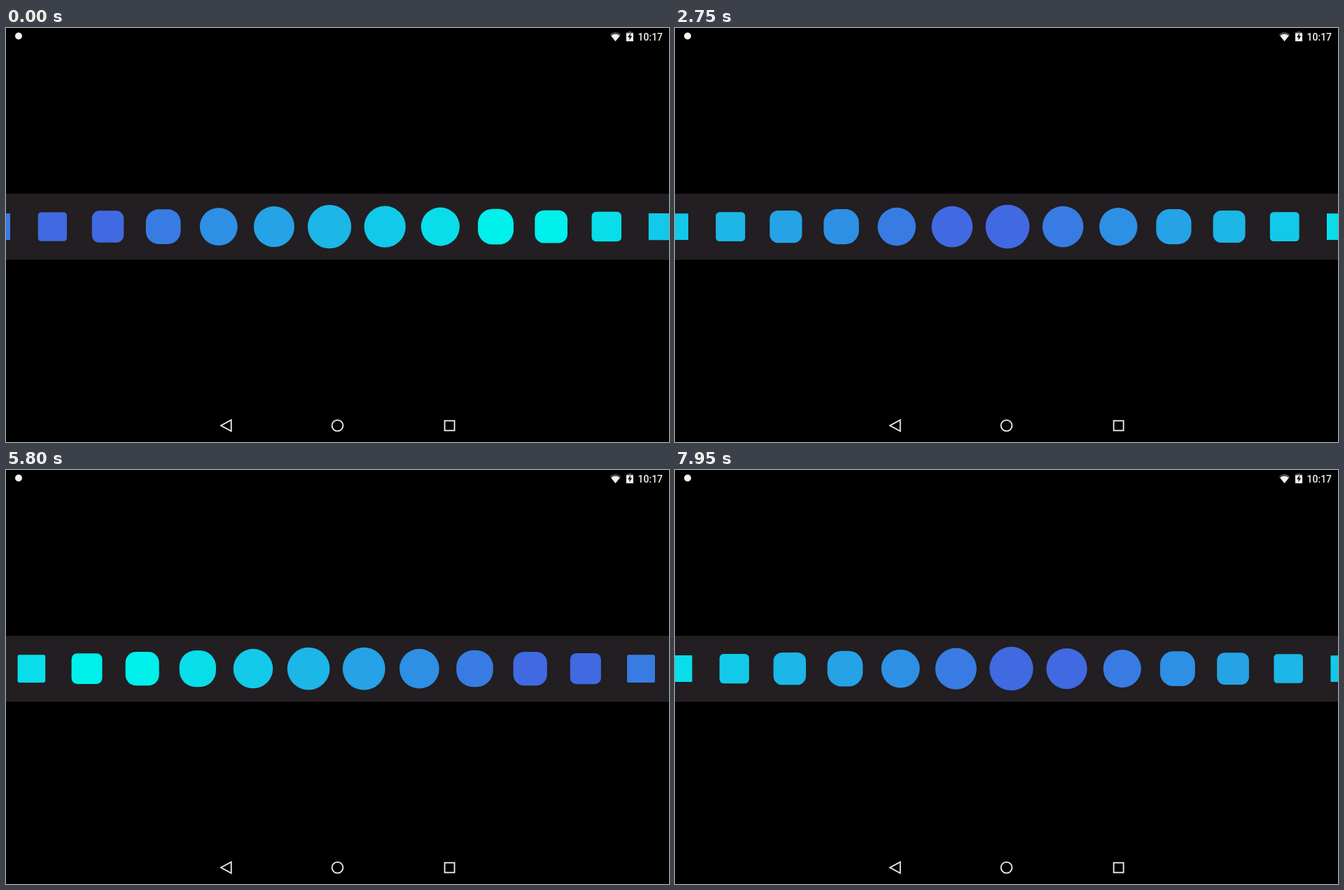
Recreate the animation shown at these times as an HTML page. Size 947 by 592 pixels, loop 8000 ms.

```html
<!DOCTYPE html>
<html lang="en">
<head>
<meta charset="utf-8">
<title>Shape carousel</title>
<style>
  html, body { margin: 0; width: 100%; height: 100%; overflow: hidden; background: #000; }
  svg { display: block; width: 100vw; height: 100vh; }
  text { font: 500 14px Roboto, sans-serif; fill: #f2f2f2; }
</style>
</head>
<body>
<svg viewBox="0 0 947 592">
  <rect width="947" height="592" fill="#000"/>
  <rect y="237" width="947" height="94.5" fill="#221e21"/>
  <g id="row"></g>

  <g fill="#f2f2f2">
    <circle cx="18" cy="11.5" r="5"/>
    <path d="M862.7 9.2Q870.5 2.8 878.4 9.2L870.5 19Z" fill="#4d4d4d"/>
    <path d="M864.3 11.2Q870.5 6.4 876.8 11.2L870.5 19Z"/>
    <path d="M889 6V4.8h4V6h3v13h-10V6Z" fill="#4d4d4d"/>
    <path d="M886 7.5h10V19h-10Z"/>
    <path d="M892.2 7.5L888 13.2h2.5V17.3L894.2 11.6h-2.5Z" fill="#000"/>
  </g>
  <text x="902.5" y="17.8">10:17</text>

  <g fill="none" stroke="#f2f2f2" stroke-width="1.8">
    <path d="M321.7 560.5V576.5L307 568.5Z"/>
    <circle cx="473.5" cy="568.5" r="7.9"/>
    <rect x="626.6" y="561.6" width="14" height="14"/>
  </g>
</svg>
<script>
const LOOP = 8000, STEP = 50;
const MID = 473.5, CY = 284.1, SIZE = 62.9, GAP = 79.15;

// Drag keys: time, position, speed (px/ms)
const KEYS = [
  [0, 105.9, 0],
  [700, 105.9, 0],
  [1250, 464.6, 0.2],
  [2100, 270.8, 0],
  [3400, 665, 0.2],
  [4550, 816.8, 0.05],
  [4550, 816.8, 0],
  [5200, 816.8, 0],
  [6650, 693.2, -0.12],
  [7950, 520, -0.14],
  [LOOP, 513, -0.14]
];

// Cubic Hermite between the two keys around t
function scrollAt(t) {
  let i = 1;
  while (i < KEYS.length - 1 && KEYS[i][0] <= t) i++;
  const [t0, p0, v0] = KEYS[i - 1], [t1, p1, v1] = KEYS[i];
  const d = t1 - t0, u = (t - t0) / d, w = 1 - u;
  return p0 * w * w * (1 + 2 * u) + v0 * d * u * w * w
       + p1 * u * u * (3 - 2 * u) - v1 * d * u * u * w;
}

const BLUE = [65, 105, 225], CYAN = [0, 240, 236];
function colour(j) {
  const k = ((j % 16) + 16) % 16;
  const mix = (k < 8 ? k : 15 - k) / 7;
  return `rgb(${BLUE.map((c, i) => Math.round(c + (CYAN[i] - c) * mix))})`;
}

const row = document.getElementById('row');
const shapes = Array.from({ length: 14 }, () =>
  row.appendChild(document.createElementNS('http://www.w3.org/2000/svg', 'rect')));

function draw(t) {
  const origin = scrollAt(t) + GAP / 2;
  const first = Math.ceil((-SIZE - origin) / GAP);
  shapes.forEach((shape, i) => {
    const j = first + i;
    const x = origin + j * GAP;
    const far = Math.min(1, Math.abs(x - MID) / MID);
    const size = SIZE * (1 - 0.4 * far);
    const attrs = {
      x: x - size / 2, y: CY - size / 2, width: size, height: size,
      rx: size / 2 * Math.min(1, 1.55 * (1 - far)),
      fill: colour(j)
    };
    for (const name in attrs) shape.setAttribute(name, attrs[name]);
  });
}

const start = performance.now();
function tick() {
  const t = (performance.now() - start) % LOOP;
  draw(Math.floor(t / STEP) * STEP);
  requestAnimationFrame(tick);
}
tick();
</script>
</body>
</html>
```
